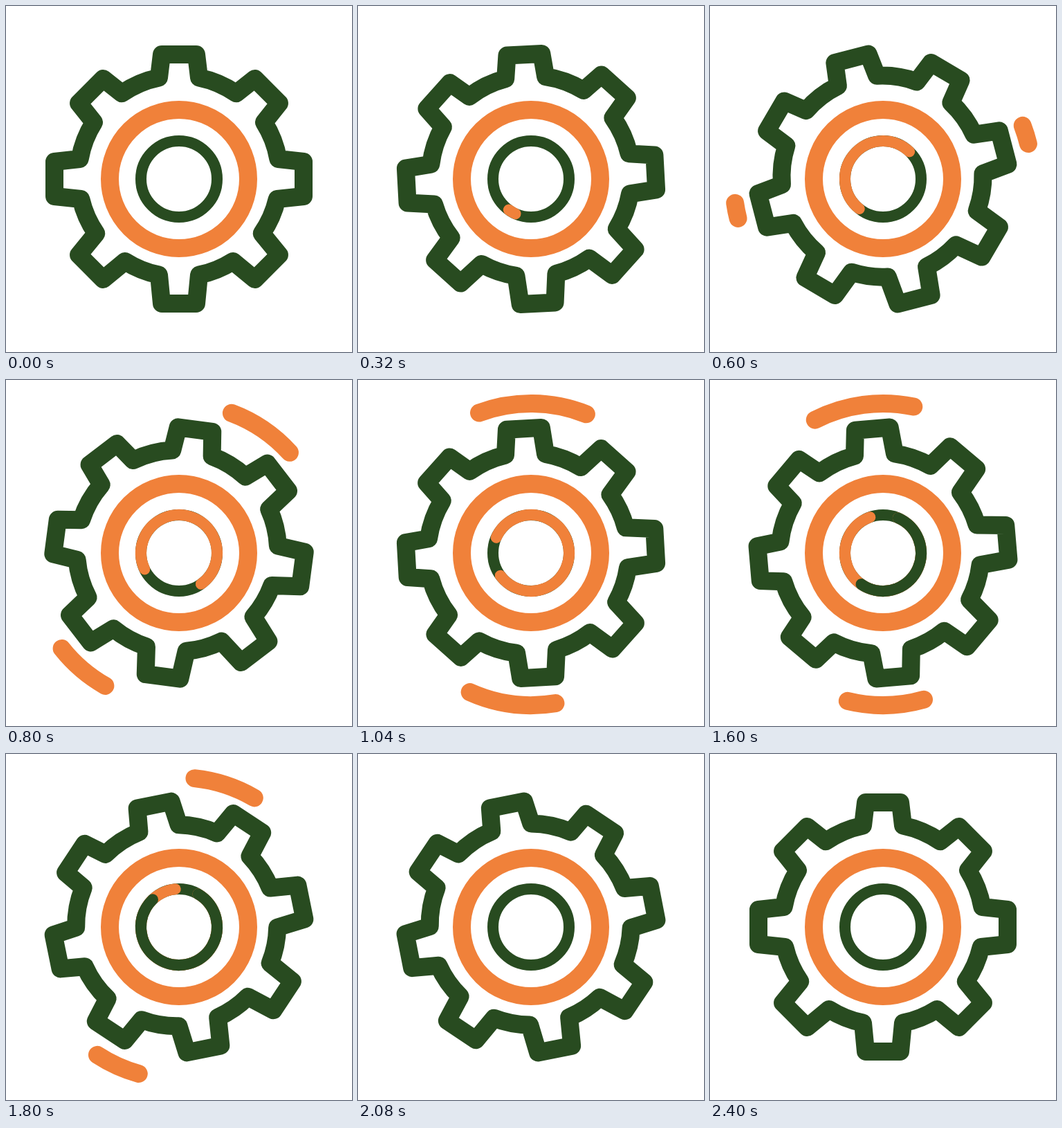
Write an HTML page with a canvas that moves like this. It is 500 px wide and 500 px high and loops after 2480 ms.

```html
<!DOCTYPE html>
<html lang="en">
<head>
<meta charset="utf-8">
<title>Turning gear</title>
<style>
  html, body { margin: 0; width: 100%; height: 100%; overflow: hidden; background: #fff; }
  canvas { display: block; width: 500px; height: 500px; }
</style>
</head>
<body>
<canvas id="stage" width="500" height="500"></canvas>
<script>
const ctx = document.getElementById('stage').getContext('2d');
const GREEN = '#284b20', ORANGE = '#f0813a';
const LOOP = 2480, STEP = 40, LAST = 2400;

const rad = deg => deg * Math.PI / 180;
const progress = (t, from, to) => Math.min(1, Math.max(0, (t - from) / (to - from)));
const easeOut = (u, power) => 1 - (1 - u) ** power;
const easeInOut = u => u < 0.5 ? 2 * u * u : 1 - 2 * (1 - u) ** 2;

// Bezier easing that is at rest at both ends.
function bezier(x1, x2) {
  const x = s => 3 * s * (1 - s) ** 2 * x1 + 3 * s * s * (1 - s) * x2 + s ** 3;
  return u => {
    let low = 0, high = 1;
    for (let i = 0; i < 24; i++) {
      const mid = (low + high) / 2;
      if (x(mid) < u) low = mid; else high = mid;
    }
    return low * low * (3 - 2 * low);
  };
}

function strokeArc(y, radius, from, to, width, color) {
  ctx.beginPath();
  ctx.arc(250, y, radius, rad(from - 90), rad(to - 90));
  ctx.lineWidth = width;
  ctx.strokeStyle = color;
  ctx.stroke();
}

const windUp = bezier(0.9, 0.47), unwind = bezier(0.48, 0.35);
function gearAngle(t) {
  const turn = 106.5, peak = 1360;
  return -turn * (windUp(progress(t, 0, peak)) - unwind(progress(t, peak, LAST)));
}

function drawGear(angle) {
  const tipRadius = 180, tipHalf = 25, baseHalf = 29, body = 145.5, shift = 4;
  const baseAngle = (a, side) => a - Math.PI / 2 + Math.asin((side + shift * Math.sin(a)) / body);
  ctx.save();
  ctx.translate(250, 250);
  ctx.rotate(rad(angle));
  ctx.beginPath();
  for (let i = 0; i < 8; i++) {
    const a = i * Math.PI / 4, s = Math.sin(a), c = Math.cos(a);
    for (const half of [-tipHalf, tipHalf])
      ctx.lineTo(tipRadius * s + half * c, half * s - tipRadius * c);
    ctx.arc(0, -shift, body, baseAngle(a, baseHalf), baseAngle(a + Math.PI / 4, -baseHalf));
  }
  ctx.closePath();
  ctx.lineWidth = 26;
  ctx.strokeStyle = GREEN;
  ctx.stroke();
  ctx.restore();
}

// An orange arc runs round the inner ring, then green chases it away.
function drawInnerRing(t) {
  const begin = 305, chase = 1340, end = 2040, origin = 204;
  const ring = (from, to, color) => strokeArc(250, 55, from, to, 16, color);
  ring(0, 360, GREEN);
  if (t < begin || t >= end) return;

  const tail = origin + 186 * easeInOut(progress(t, begin, 1800));
  const head = origin + 520 * easeOut(progress(t, begin, LAST), 3.2);
  ring(tail, head, ORANGE);
  if (t > chase)
    ring(tail, tail + (head - tail) * easeOut(progress(t, chase, end), 2), GREEN);
}

// Two arcs sweep out beside the gear and slip back again.
function drawSwooshes(t) {
  const begin = 540, peak = 1320, end = 2060;
  if (t < begin || t >= end) return;

  const out = progress(t, begin, peak), back = progress(t, peak, end);
  const swing = (outPower, backPower) => easeOut(out, outPower) - back ** backPower;
  const lead = swing(1.8, 2.32), tail = swing(1.62, 2.8);
  const sweep = (y, start, leadReach, tailReach) =>
    strokeArc(y, 216, start - leadReach * lead, start - tailReach * tail, 26, ORANGE);
  sweep(250, 86, 126.3, 79.4);
  sweep(254, 272, 120.5, 83.8);
}

function draw(t) {
  ctx.fillStyle = '#fff';
  ctx.fillRect(0, 0, 500, 500);
  ctx.lineCap = ctx.lineJoin = 'round';
  drawGear(gearAngle(t));
  strokeArc(250, 100, 0, 360, 26, ORANGE);
  drawInnerRing(t);
  drawSwooshes(t);
}

const startTime = performance.now();
function tick() {
  const t = (performance.now() - startTime) % LOOP;
  draw(Math.min(LAST, Math.floor(t / STEP) * STEP));
  requestAnimationFrame(tick);
}
tick();
</script>
</body>
</html>
```
